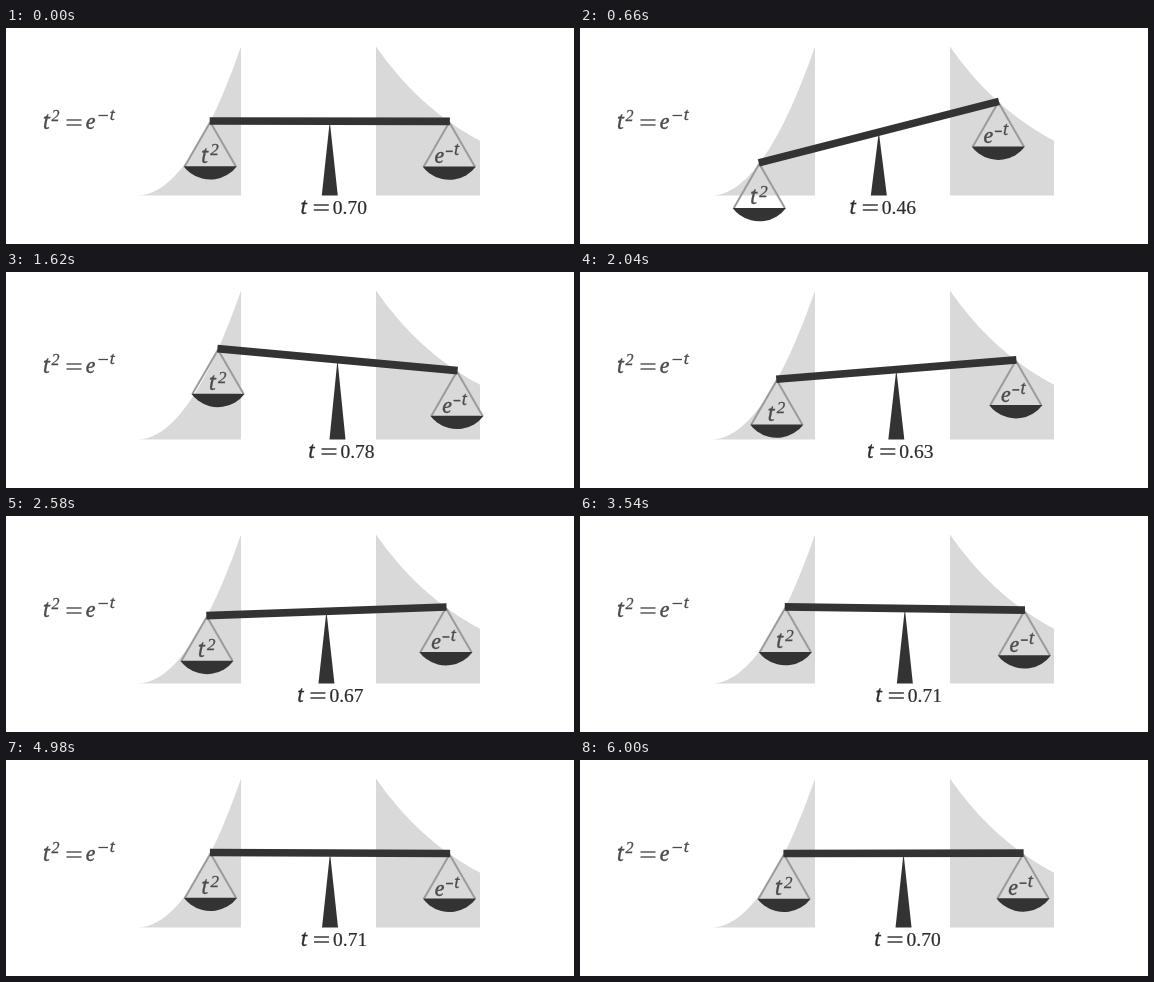
Animation, 568 px wide and 216 px high, one loop 6.06 s. Source, as an HTML page with a canvas:

```html
<!DOCTYPE html>
<html lang="en">
<head>
<meta charset="utf-8">
<title>Balance of t² and e^-t</title>
<style>
html, body { margin: 0; width: 100%; height: 100%; overflow: hidden; background: #fff; }
canvas { display: block; }
</style>
</head>
<body>
<canvas id="stage" width="568" height="216"></canvas>
<script>
const ctx = document.getElementById('stage').getContext('2d');
const LOOP = 6060, STEP = 60, RELEASE = 180, REST_END = 240, REST_T = 0.7045;
const LEFT = 131, RIGHT = 370, UNIT_X = 104, BASE = 167.5, UNIT_Y = 149;
const DARK = '#333', GRAY = '#d9d9d9', STRING = '#9b9b9b', INK = '#4c4c4c', LABEL = '#2c2c2c';
const SERIF = '"Liberation Serif", serif', WIDE = '"Noto Serif", serif';

const square = t => t * t;
const decay = t => Math.exp(-t);
const toY = v => BASE - UNIT_Y * v;

// Damped motion driven by the difference of both sides, sampled once per step.
const poses = (() => {
  const samples = [];
  let t = 0.015, v = 0;
  for (let ms = RELEASE; ms < LOOP; ms++) {
    if (ms % STEP === 0) samples[ms / STEP] = t;
    v += (6.1 * (decay(t) - square(t)) - 2.1 * v) / 1000;
    t += v / 1000;
  }
  return samples;
})();

function text(str, x, y, font, color = INK, bold = 0.3) {
  ctx.font = font;
  ctx.fillStyle = ctx.strokeStyle = color;
  ctx.lineWidth = bold;
  ctx.fillText(str, x, y);
  ctx.strokeText(str, x, y);
}

const variable = (name, x, y, size, color) => text(name, x, y, `italic ${size}px ${WIDE}`, color);

function line(x1, y1, x2, y2, width, color) {
  ctx.strokeStyle = color;
  ctx.lineWidth = width;
  ctx.beginPath();
  ctx.moveTo(x1, y1);
  ctx.lineTo(x2, y2);
  ctx.stroke();
}

function equals(x, y, color) {
  line(x, y - 9, x + 15, y - 9, 1.4, color);
  line(x, y - 4, x + 15, y - 4, 1.4, color);
}

function area(fn, x0) {
  ctx.fillStyle = GRAY;
  ctx.beginPath();
  ctx.moveTo(x0, BASE);
  for (let i = 0; i <= 60; i++) ctx.lineTo(x0 + UNIT_X * i / 60, toY(fn(i / 60)));
  ctx.lineTo(x0 + UNIT_X, BASE);
  ctx.fill();
}

function pan(x, y) {
  const half = 26.7, depth = 13.4, top = y + 45.1;
  const radius = (half * half + depth * depth) / (2 * depth);
  const angle = Math.asin(half / radius);
  for (const side of [-1, 1]) line(x, y + 1, x + side * 25.5, top, 2, STRING);
  ctx.fillStyle = DARK;
  ctx.beginPath();
  ctx.arc(x, top + depth - radius, radius, Math.PI / 2 - angle, Math.PI / 2 + angle);
  ctx.fill();
}

function equation() {
  variable('t', 36.5, 101, 21);
  text('2', 45.5, 92.5, `italic 16px ${SERIF}`);
  equals(60.5, 101, INK);
  variable('e', 79.5, 101, 20);
  line(92.5, 87.5, 102, 87.5, 1.3, INK);
  variable('t', 103.5, 92, 15);
}

function scale(t) {
  const xl = LEFT + UNIT_X * t, xr = RIGHT + UNIT_X * t;
  const yl = toY(square(t)) - 0.5, yr = toY(decay(t)) - 0.5;
  const mid = (xl + xr) / 2;

  pan(xl, yl);
  pan(xr, yr);
  ctx.fillStyle = DARK;
  ctx.beginPath();
  ctx.moveTo(mid, (yl + yr) / 2);
  ctx.lineTo(mid + 8, BASE);
  ctx.lineTo(mid - 8, BASE);
  ctx.fill();
  line(xl - 0.6, yl, xr + 0.6, yr, 7.6, DARK);

  variable('t', xl - 9.5, yl + 41.5, 21);
  text('2', xl, yl + 34, `italic 17px ${SERIF}`);
  variable('e', xr - 15, yr + 42, 20);
  line(xr - 3.5, yr + 30, xr + 3.5, yr + 30, 1.6, INK);
  variable('t', xr + 4.5, yr + 34, 15.5);

  variable('t', mid - 29.5, 186, 19, LABEL);
  equals(mid - 16, 186, LABEL);
  text(t.toFixed(2), mid + 3, 186, `19.5px ${SERIF}`, LABEL, 0.2);
}

function draw(ms) {
  const t = ms < REST_END ? REST_T : poses[Math.floor(ms / STEP)];
  ctx.fillStyle = '#fff';
  ctx.fillRect(0, 0, 568, 216);
  equation();
  ctx.save();
  ctx.beginPath();
  ctx.rect(130, 18, 420, 180);
  ctx.clip();
  area(square, LEFT);
  area(decay, RIGHT);
  scale(t);
  ctx.restore();
}

const start = performance.now();
function frame() {
  draw((performance.now() - start) % LOOP);
  requestAnimationFrame(frame);
}
frame();
</script>
</body>
</html>
```
